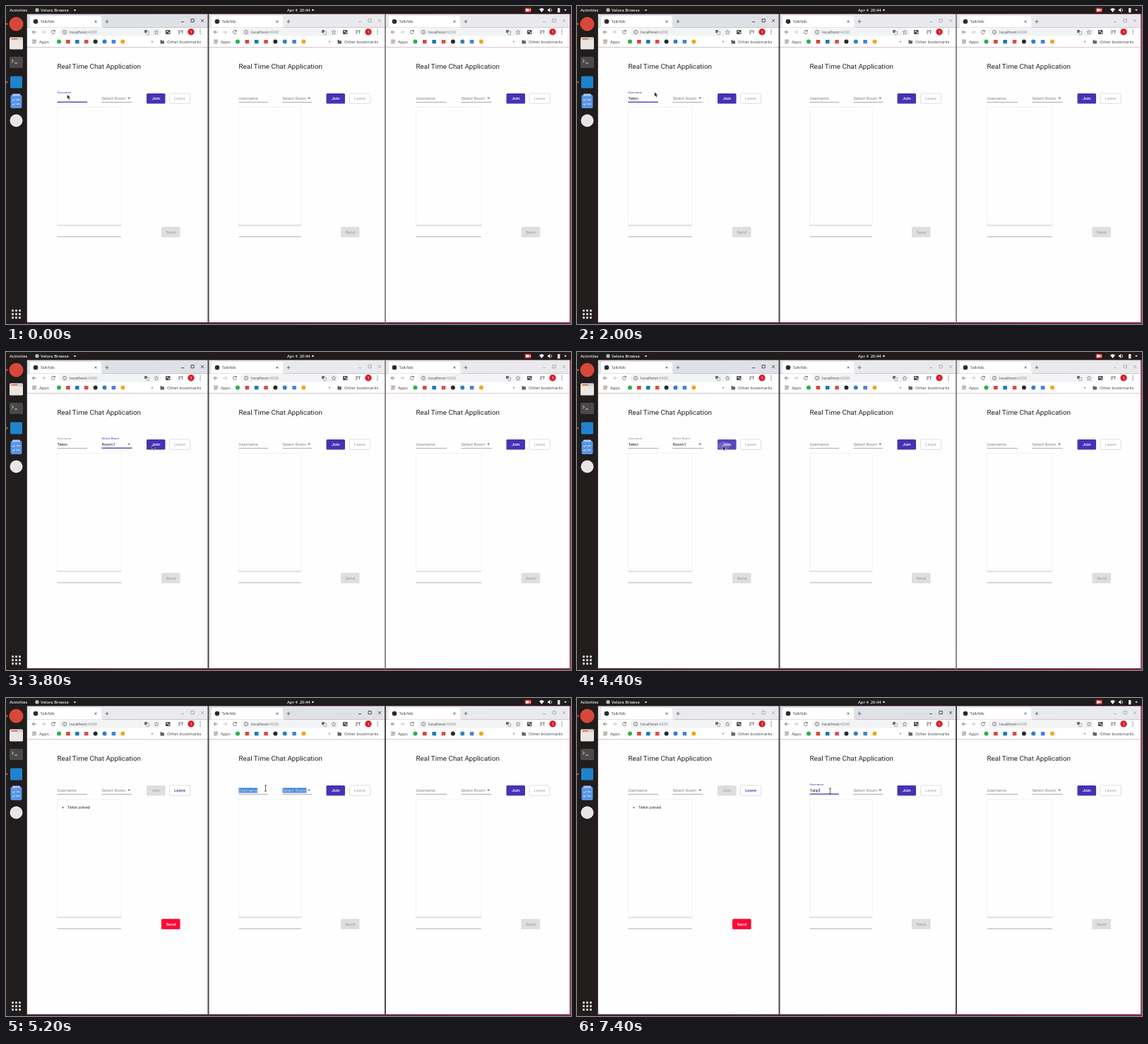
An HTML page for the animation above (8000 ms loop, 800x451 px).

```html
<!DOCTYPE html>
<html lang="en">
<head>
<meta charset="utf-8">
<title>Real Time Chat</title>
<style>
  html, body { margin: 0; width: 100%; height: 100%; overflow: hidden; background: #241d20; }
  svg { display: block; width: 100%; height: 100%; }
  text { font-family: Roboto, sans-serif; font-size: 6px; fill: #303030; white-space: pre; }
  .ui { font-family: "Open Sans", "Noto Sans", sans-serif; font-size: 5.9px; fill: #3c4043; }
  .bar { font-size: 5.8px; font-weight: 600; fill: #e8e8e8; }
  .title { font-size: 9.9px; fill: #202020; }
  .hint { fill: #868686; }
  .small { font-size: 4.4px; }
  .btn { font-weight: 500; text-anchor: middle; }
  .line { fill: none; stroke: #5f6368; stroke-width: .9; }
</style>
</head>
<body>
<svg id="stage" viewBox="0 0 800 451" preserveAspectRatio="none"></svg>
<script>
const PURPLE = '#4632b4', GREY = '#868686';

const rect = (x, y, w, h, fill, more = '') =>
  `<rect x="${x}" y="${y}" width="${w}" height="${h}" fill="${fill}" ${more}/>`;
const dot = (x, y, r, fill) => `<circle cx="${x}" cy="${y}" r="${r}" fill="${fill}"/>`;
const path = (d, more = 'class="line"') => `<path d="${d}" ${more}/>`;
const fillPath = (d, fill) => path(d, `fill="${fill}"`);
const text = (x, y, s, cls = '', fill = '') =>
  `<text x="${x}" y="${y}" class="${cls}" ${fill && `style="fill:${fill}"`}>${s}</text>`;
const grid = (x, y, gap, size, fill) =>
  Array.from({ length: 9 }, (_, i) =>
    rect(x + (i % 3 - 1) * gap - size / 2, y + ((i / 3 | 0) - 1) * gap - size / 2, size, size,
      Array.isArray(fill) ? fill[i % fill.length] : fill)).join('');

// left/right edges of each window and its page columns
const windows = [
  { l: 30, r: 286, page: 73, nameEnd: 115, room: 136, roomEnd: 178.5, join: 199, leave: 231.5, leaveW: 29, cardEnd: 163, send: 220, marks: 75 },
  { l: 287, r: 537, page: 330, nameEnd: 371, room: 392, roomEnd: 433.5, join: 453.5, leave: 486.5, leaveW: 29, cardEnd: 418, send: 474, marks: 328 },
  { l: 538, r: 798, page: 581, nameEnd: 624, room: 645, roomEnd: 687.5, join: 708.5, leave: 741, leaveW: 29, cardEnd: 673, send: 729.5, marks: 579.5 }
];

function desktop() {
  const bar = rect(0, 0, 800, 11, '#1f1c1b') +
    text(5, 8, 'Activities', 'ui bar') + dot(44, 5.7, 2.7, '#b9b9b9') +
    text(49, 8, 'Velora Browse', 'ui bar') + fillPath('M95.500 5h4l-2 2.500z', '#ddd') +
    text(398, 8, 'Apr 4  20:44', 'ui bar') + dot(434.5, 5.7, 1.3, '#eee') +
    rect(734.5, 2.5, 9, 6.5, '#d92f2f', 'rx="1"') + rect(736, 4, 4, 3.5, '#fff') + fillPath('M740 5.700l2.500-1.700v3.400z', '#fff') +
    fillPath('M755 4.500q3.500-3 7 0l-3.500 4.500z', '#eee') +
    fillPath('M767 4.600h1.500l2-2v6.500l-2-2H767z', '#eee') + path('M772 3.800q1.500 2 0 4', 'fill="none" stroke="#eee" stroke-width=".8"') +
    rect(781, 3, 3.4, 6.3, '#eee', 'rx=".5"') + fillPath('M790 4.800h4l-2 2.500z', '#ddd');
  const dock = rect(0, 11, 30, 440, '#211d1c') +
    dot(14.5, 25.5, 10, '#d8483a') + dot(1.3, 25.5, 1.2, '#e2572b') +
    rect(5, 44.5, 19, 17, '#e9e6e3', 'rx="1.500"') + rect(5, 44.5, 19, 4, '#d7cfc9', 'rx="1.500"') + rect(8, 46, 8, 1.4, '#e0603a') +
    rect(5, 72, 19, 16, '#4a4a4a', 'rx="1.500"') + path('M8 76l2.500 2-2.500 2M12 81h4', 'fill="none" stroke="#ddd" stroke-width=".9"') +
    rect(6, 99.5, 17, 17, '#1f83cd', 'rx="1.500"') + dot(1.3, 108, 1.2, '#e2572b') +
    rect(6.5, 126, 16, 19, '#5a95e6', 'rx="2"') + rect(9, 124.5, 11, 3, '#a9c8f3', 'rx="1"') +
    path('M9 133l1.500 1.500 2-2.500M14.500 133h5M9 139l1.500 1.500 2-2.500M14.500 139h5', 'fill="none" stroke="#e6f0ff" stroke-width="1"') +
    dot(14.5, 162.5, 9, '#e9e4e8') + grid(14.5, 437, 5, 2.7, '#f2f2f2');
  return rect(0, 0, 800, 451, 'url(#wall)') + bar + dock;
}

function toolbar({ l, r, marks }, active) {
  const ctrl = active ? '#3c4043' : '#a5a8ac';
  const ink = `fill="none" stroke="${ctrl}" stroke-width=".9"`;
  const tab = rect(l, 11.5, r - l, 19, active ? '#dee1e6' : '#e8eaed') +
    fillPath(`M${l + 1} 30.500q3 0 3-3V17q0-3 3-3h95q3 0 3 3v10.500q0 3 3 3z`, '#fff') +
    dot(l + 12, 22, 3.3, '#2b2b30') + text(l + 18.5, 24, 'TalkNib', 'ui') +
    path(`M${l + 95.5} 20.500l3 3m0-3l-3 3`) + path(`M${l + 110.5} 22h5m-2.500-2.500v5`) +
    path(`M${r - 38} 22.500h4`, ink) + path(`M${r - 24} 18.500h4.200v4.200h-4.200z`, ink) +
    path(`M${r - 10} 18.800l4 4m0-4l-4 4`, ink);
  const nav = rect(l, 30.5, r - l, 28, '#fff') +
    path(`M${l + 12.5} 37h-5m2.300-2.400l-2.400 2.400 2.400 2.400`) +
    path(`M${l + 20.5} 37h5m-2.300-2.400l2.400 2.400-2.400 2.400`, 'fill="none" stroke="#b6b9bc" stroke-width=".9"') +
    path(`M${l + 39} 35.400a2.500 2.500 0 1 0 .4 2.300M${l + 39.3} 34v2h-2`) +
    rect(l + 45, 31.5, r - l - 111, 11, '#f1f3f4', 'rx="5.500"') +
    path(`M${l + 50.3} 37a2.700 2.700 0 1 0 5.400 0a2.700 2.700 0 1 0 -5.400 0M${l + 53} 36.500v2M${l + 53} 35v.7`, 'class="line" style="stroke-width:.7"') +
    `<text x="${l + 60}" y="39" class="ui" style="font-size:5.800px">localhost:<tspan fill="#85888c">4200</tspan></text>` +
    rect(r - 90, 34, 4, 4, '#6b7075') + rect(r - 87, 36.2, 3.6, 4, '#fff', 'stroke="#6b7075" stroke-width=".6"') +
    path(`M${r - 73} 34l.9 2 2.100.2-1.600 1.500.5 2.200-1.900-1.200-1.900 1.200.5-2.200-1.600-1.500 2.100-.2z`, 'fill="none" stroke="#5f6368" stroke-width=".6"') +
    rect(r - 60, 34, 6.5, 6, '#4b4e52', 'rx=".8"') + rect(r - 58.5, 35.3, 2, 1.5, '#fff') + rect(r - 56, 37, 1.5, 2, '#ddd') +
    path(`M${r - 42} 35h5m-5 2h3m-3 2h2.500M${r - 36.5} 39v-4h1.500`) +
    dot(r - 24, 36.7, 4.7, '#d5202b') + text(r - 25.4, 38.6, '1', 'ui', '#fff') +
    [34, 36.7, 39.4].map(y => dot(r - 11, y, .75, '#5f6368')).join('');
  const step = r === 286 ? 12.9 : 13.35;
  const colours = ['#25b34b', '#db4437', '#1b78b8', '#dd4b4b', '#24292e', '#2f7fc6', '#4a7fe0', '#f3a51c'];
  const icons = colours.map((c, i) => {
    const x = marks + i * step;
    return i % 2 && i < 6 && i !== 5 || i === 2 || i === 6
      ? rect(x - 2.8, 48, 5.6, 5.2, c, 'rx=".6"') : dot(x, 50.6, 3, c);
  }).join('');
  return tab + nav + grid(l + 10, 50.5, 2, 1.5, ['#e25a4b', '#4a86e8', '#55a868', '#eea63c', '#777']) +
    text(l + 17, 52.6, 'Apps', 'ui') + icons + text(r - 80.5, 52.4, '»', 'ui') +
    fillPath(`M${r - 67.5} 48.300h2l.8.9h2.700v4.300h-5.500z`, '#5f6368') +
    text(r - 58, 52.6, 'Other bookmarks', 'ui');
}

const underline = (x, end, on) => rect(x - .5, on ? 135.6 : 136, end - x + .5, on ? 1.3 : .8, on ? PURPLE : '#999');

function field(x, end, label, value, focus, floated) {
  const up = floated || value || focus;
  return (up ? text(x - .5, 123.8, label, 'small', focus ? PURPLE : GREY) : text(x - .5, 133, label, 'hint')) +
    (value ? text(x - .5, 133, value, '', '#222') : '') + underline(x, end, focus);
}

function button(x, y, w, h, label, fill, ink, border) {
  return rect(x, y, w, h, fill, `rx="1.500" ${border ? 'stroke="#dcdcdc" stroke-width=".9"' : ''}`) +
    text(x + w / 2, y + h / 2 + 2.1, label, 'btn', ink);
}

function page(w, s) {
  const cardW = w.cardEnd - w.page;
  let out = rect(w.l, 58.5, w.r - w.l, 390, '#fefefe') +
    text(w.page - .5, 89.3, 'Real Time Chat Application', 'title');
  if (s.selected) out += rect(w.page - .5, 127.5, 26.5, 7, '#3d84e6') + rect(w.room - .5, 127.5, 34, 7, '#3d84e6');
  out += field(w.page, w.nameEnd, 'Username', s.name, s.nameFocus) +
    field(w.room, w.roomEnd, 'Select Room', s.room, s.roomFocus) +
    fillPath(`M${w.roomEnd - 6.5} 129.700h4.400l-2.200 2.400z`, '#777');
  if (s.selected) out += text(w.page - .5, 133, 'Username', '', '#cfe2ff') + text(w.room - .5, 133, 'Select Room', '', '#cfe2ff');
  if (s.caret) out += rect(w.page + s.caret, 127.8, .7, 6.2, '#333');
  out += s.joined
    ? button(w.join, 124, 26.5, 14.5, 'Join', '#dedede', '#a6a6a6')
    : button(w.join, 124, 26.5, 14.5, 'Join', PURPLE, '#fff');
  if (s.ripple) out += rect(w.join, 124, 26.5, 14.5, '#fff', 'rx="1.500" opacity=".1"') +
    `<ellipse cx="${w.join + 9}" cy="133" rx="${s.ripple}" ry="5.500" fill="#fff" opacity=".16"/>`;
  out += button(w.leave, 124, w.leaveW, 14.5, 'Leave', '#fff', s.joined ? PURPLE : '#b5b5b5', true) +
    rect(w.page - .5, 143.5, cardW + .5, 167.5, '#fefefe', 'stroke="#f1f1f1" stroke-width=".8"') +
    rect(w.page - .5, 310.6, cardW + .5, .9, '#bdbdbd') + rect(w.page, 311.5, cardW, .8, '#ebebeb') +
    rect(w.page - .5, 326.7, cardW + .5, .8, '#999') +
    button(w.send, 313.3, 26.5, 14.7, 'Send', s.joined ? '#ff0735' : '#dedede', s.joined ? '#fff' : '#a6a6a6');
  if (s.joined) out += dot(w.page + 7.5, 155.4, .9, '#222') + text(w.page + 14, 157, 'Tekin joined');
  if (s.menu) out += rect(129, 122.3, 56, 36.5, '#000', 'rx="1.500" opacity=".22" filter="url(#soft)"') +
    rect(129, 122, 56, 35.5, '#fff', 'rx="1.500"') + rect(129, 122, 56, 17.7, '#f2f2f2', 'rx="1"') +
    text(136, 133, 'Room1') + text(136, 150.6, 'Room2') + text(136, 123.6, 'Select Room', 'small', '#ccc');
  return out;
}

function pointer(x, y, beam) {
  return beam
    ? path(`M${x - 1.6} ${y - 4}h3.200m-1.600 0v8m-1.600 0h3.200`, 'fill="none" stroke="#333" stroke-width=".8"')
    : path(`M${x} ${y}v6.500l1.500-1.300 1.100 2.400 1.200-.6-1.100-2.300h2z`, 'fill="#111" stroke="#fff" stroke-width=".5"');
}

// each step changes some of the state: a, b = the left and middle windows, at = pointer
const steps = [
  [0, { front: 0, a: { nameFocus: 1 }, b: {}, at: [86.7, 125.5] }],
  [200, { at: [93, 130, 1], a: { caret: .2 } }],
  [400, { at: [103, 130.5, 1], a: { name: 'T', caret: 3.4 } }],
  [600, { at: [113, 131.5, 1] }],
  [800, { at: [110, 132, 1], a: { name: 'Te', caret: 6.5 } }],
  [1400, { at: [109.5, 132.5, 1], a: { name: 'Tekin', caret: 0 } }],
  [2000, { at: [109.8, 122] }],
  [2200, { at: [133, 114] }],
  [2400, { at: [154, 125] }],
  [2600, { at: [151, 129], a: { nameFocus: 0, roomFocus: 1, menu: 1 } }],
  [2800, { at: [148.3, 130] }],
  [3000, { at: [217.5, 130.5], a: { menu: 0, room: 'Room1' } }],
  [3200, { at: [208, 131] }],
  [3800, { at: [207, 132] }],
  [4000, { at: [206.3, 133] }],
  [4200, { a: { roomFocus: 0, ripple: 4 } }],
  [4400, { a: { ripple: 9 } }],
  [4600, { at: [250, 133], a: { ripple: 0, name: '', room: '', joined: 1 } }],
  [4800, { at: [371, 126] }],
  [5000, { front: 1, at: [370, 127, 1] }],
  [5200, { at: [367.6, 128, 1], b: { selected: 1 } }],
  [5400, { at: [362, 130, 1] }],
  [5600, { at: [359, 132, 1], b: { selected: 0, nameFocus: 1 } }],
  [5800, { at: [358.4, 132, 1] }],
  [6000, { b: { caret: .2 } }],
  [6200, { b: { name: 'T', caret: 3.4 } }],
  [6600, { b: { name: 'T', caret: 0 } }],
  [7200, { b: { name: 'Tal', caret: 8.2 } }],
  [7400, { b: { name: 'Talip', caret: 13 } }]
];

function stateAt(t) {
  const s = { a: {}, b: {} };
  for (const [start, { a, b, ...rest }] of steps) {
    if (start > t) break;
    Object.assign(s, rest);
    Object.assign(s.a, a);
    Object.assign(s.b, b);
  }
  return s;
}

const edge = (x, dark) => rect(x - 1, 11.5, 2, 438, dark ? '#4c4548' : '#8f858a');

function draw(s) {
  const states = [s.a, s.b, {}];
  return defs + backdrop +
    windows.map((w, i) => toolbar(w, i === s.front) + page(w, states[i])).join('') +
    edge(286.5, true) + edge(537, s.front === 1) +
    rect(29, 11.5, 1, 438, '#4b4145') + rect(798.4, 11.5, 1.6, 438, '#a7506d') +
    pointer(...s.at);
}

const defs = `<defs><linearGradient id="wall"><stop offset="0" stop-color="#3b2030"/><stop offset="1" stop-color="#7b2745"/></linearGradient>
  <filter id="soft" x="-20%" y="-20%" width="140%" height="150%"><feGaussianBlur stdDeviation="1.500"/></filter></defs>`;
const backdrop = desktop();
const stage = document.getElementById('stage');
const begin = performance.now();
let shown = -1;

function tick(now) {
  const t = Math.max(0, now - begin) % 8000;
  const step = steps.filter(([start]) => start <= t).length;
  if (step !== shown) {
    shown = step;
    stage.innerHTML = draw(stateAt(t));
  }
  requestAnimationFrame(tick);
}
tick(begin);
</script>
</body>
</html>
```
